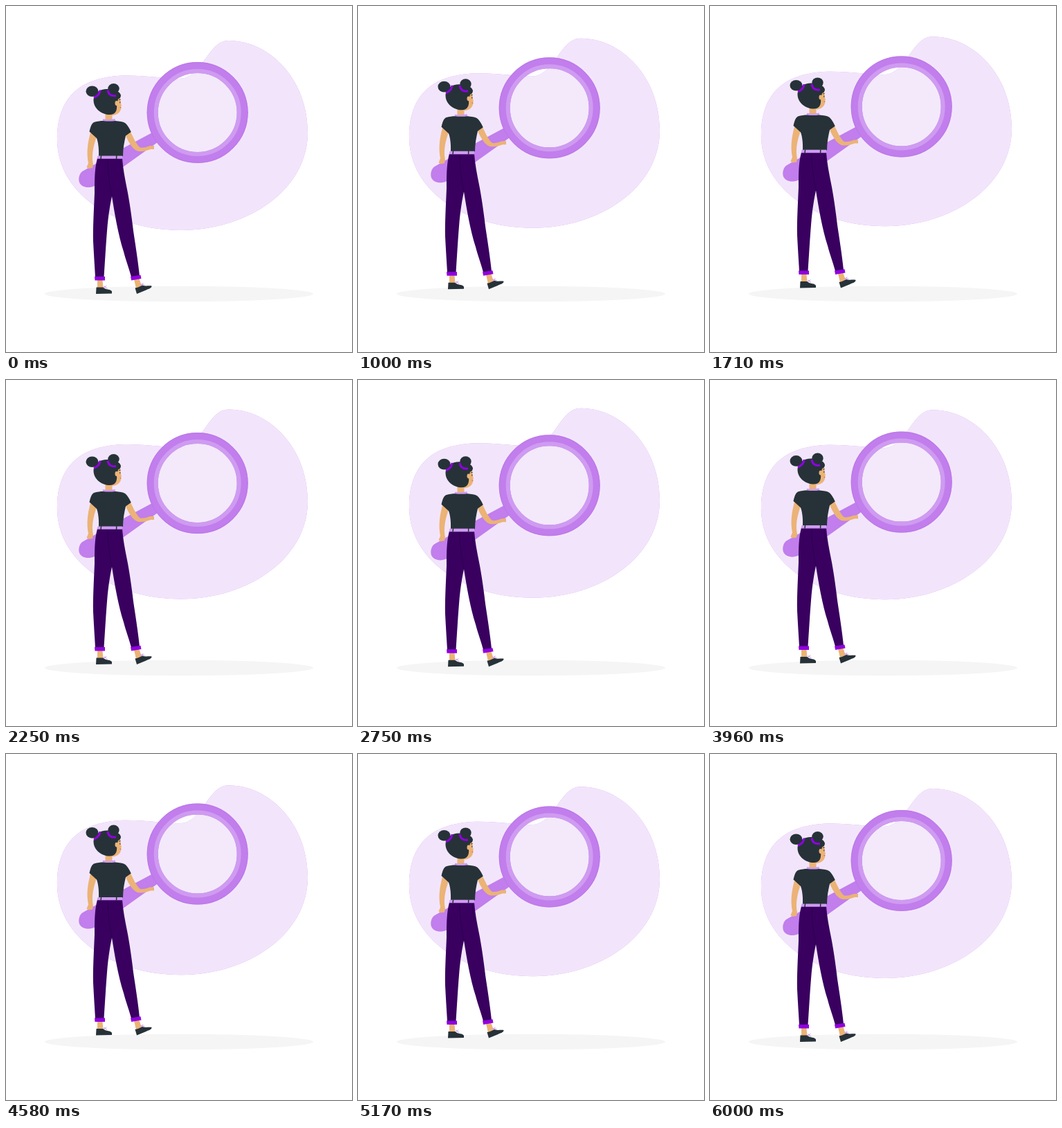
An HTML page that plays this animation: 500x500 px, repeating every 6040 ms.

```html
<!DOCTYPE html>
<html lang="en">
<head>
<meta charset="utf-8">
<title>Woman with magnifying glass</title>
<style>
  html, body { margin: 0; height: 100%; overflow: hidden; background: #fff; }
  svg { display: block; width: 100vw; height: 100vh; }
  .lilac { fill: #c17eec; }
  .dark { fill: #263238; }
  .skin { fill: #ebb376; }
  .violet { fill: #9000e0; }
  .pale { fill: #cf9bf1; }
  .pants { fill: #390060; }
  .line { fill: none; stroke-linecap: round; }
</style>
</head>
<body>
<svg viewBox="0 0 500 500">
  <defs>
    <path id="shape" d="M74 193C74 125 115 101 175 100.500C205 100.500 230 105 250 105C285 105 291 50 322 50C380 50 436 105 436 183C436 265 350 324 253 324C155 324 74 270 74 193Z"/>
  </defs>

  <g id="blob">
    <use href="#shape" class="lilac"/>
    <use href="#shape" fill="#fff" opacity=".8"/>
  </g>

  <ellipse cx="250" cy="416" rx="194" ry="11.300" fill="#f5f5f5"/>

  <g id="figure">
    <!-- magnifying glass -->
    <path class="lilac" d="M213 182L170 205L112 238C106 241 104 249 106 255C109 262 119 264 128 260C143 251 157 241 170 232L219 197Z"/>
    <circle cx="276.700" cy="154" r="57.500" fill="#f5f5f5" opacity=".22"/>
    <circle cx="276.700" cy="154" r="65" class="line" stroke="#c17eec" stroke-width="16"/>
    <circle cx="276.700" cy="154" r="72.600" class="line" stroke="#b56fe4" stroke-width=".6"/>
    <circle cx="276.700" cy="154" r="60" class="line" stroke="#cf9bf1" stroke-width="6"/>

    <!-- arms -->
    <path class="skin" d="M122 183C118 198 116 212 119 227L116.500 233L119 235L125 234L126 229C123 215 127 200 131 189Z"/>
    <path class="skin" d="M173 187C177 197 183 207 190 209.500C197 211 204 209 209 207L214 207V202L208 202C203 204 196 206 193 204C188 199 184 190 180 182Z"/>

    <!-- shoes and ankles -->
    <path class="skin" d="M132 396H139.500L140.500 408H132ZM185 395L192.500 394L196 405L188 408Z"/>
    <path class="dark" d="M130.500 406.500H140.500C144 410.500 152 409 153 412.500V415.500L130 416Z"/>
    <path class="dark" d="M186.500 407.500C190 407 194 405 197 403.500C202 405.500 207 403.500 210.500 404.500C211 408 205 409 200 411.500L189 416Z"/>
    <path class="line" stroke="#c17eec" stroke-width=".8" d="M141 407L145 404.500M141.500 405L146 408M195.500 404L198 400.500M195 402L200 403"/>

    <!-- trousers -->
    <path class="pants" d="M132 220C128 235 128 250 128 270C127 295 125.500 320 126 340C127 360 128 375 129 392H141.500C143 370 144 350 146 325C148 300 151 285 153 275C157 300 162 330 170 355C174 370 178 380 181 391.500L193 390C191 370 187 345 184 325C181 300 178 280 175 265C172 250 169 235 168 220Z"/>
    <path class="line" stroke="#260044" stroke-width=".7" d="M147 222C147 242 150 258 153 275M165 223C166 232 167 239 168 247"/>
    <path class="violet" d="M128 391H143V396.500H128.500ZM180 391L194.500 388.800L195.500 394L181.200 396.500Z"/>

    <!-- neck, collar, shirt, belt -->
    <path class="skin" d="M143.500 153H153.500V165H143.500Z"/>
    <path class="pale" d="M140 163.300Q149 165 157.500 163L158.500 167H139.500Z"/>
    <path class="dark" d="M127 168C132 166.500 137 166 140 166Q149 167 158 166C164 166.500 169 167 172 169C176 172 179 178 180.800 182L173 187.500C171 196 169 206 169 217H134C134.500 205 133 196 131 191L120.500 181.500C122 175 123.500 170 127 168Z"/>
    <path class="pale" d="M132.500 216.400H168L168.300 220.800H131.600Z"/>
    <path class="dark" d="M136.800 216H138.300L137.800 221H136.300ZM159 216H160.500L160.300 221H158.800Z"/>

    <!-- head -->
    <path class="skin" d="M157 130L165 132.500C165.700 136 165.700 139 166 141L167 144L166 145.500L166.300 148C165.500 153 162 157 154 158L148 153Z"/>
    <ellipse class="dark" cx="124.500" cy="123.300" rx="9" ry="7.800"/>
    <ellipse class="dark" cx="155.500" cy="119.300" rx="8.200" ry="7.300"/>
    <path class="dark" d="M126.500 135C127 126 136 120 146 120C155 120 165 123 166 129C166 132 164.500 134 162 134.500C161.500 138 160 139 160 143C161 151 158 157 150 157C139 157 126 149 126.500 135Z"/>
    <ellipse class="skin" cx="159.700" cy="140.500" rx="2.200" ry="3.400"/>
    <path class="line" stroke="#263238" stroke-width="1" d="M163.500 135.500L165.200 135.200M164.800 138.500V140"/>
    <path class="line" stroke="#c4574e" stroke-width="1" d="M165 146.700H166"/>
    <path class="line" stroke="#9000e0" stroke-width="3" style="stroke-linecap:butt" d="M136 121.500C136 126 132.500 130 127 132.500M147 121.500C147.500 127 152 131 159 129.500"/>
  </g>
</svg>
<script>
  const LOOP = 6040, SPAN = 6000, RISE = 10;
  const blob = document.getElementById('blob');
  const figure = document.getElementById('figure');

  // Linear rise and fall, once per period
  const lift = (t, period) => -RISE * (1 - Math.abs(1 - 2 * (t % period) / period));
  const move = (el, y) => el.setAttribute('transform', `translate(0 ${y})`);

  function draw(now) {
    const t = Math.min(now % LOOP, SPAN);
    move(blob, lift(t, SPAN));
    move(figure, lift(t, SPAN / 2));
    requestAnimationFrame(draw);
  }
  draw(0);
</script>
</body>
</html>
```
